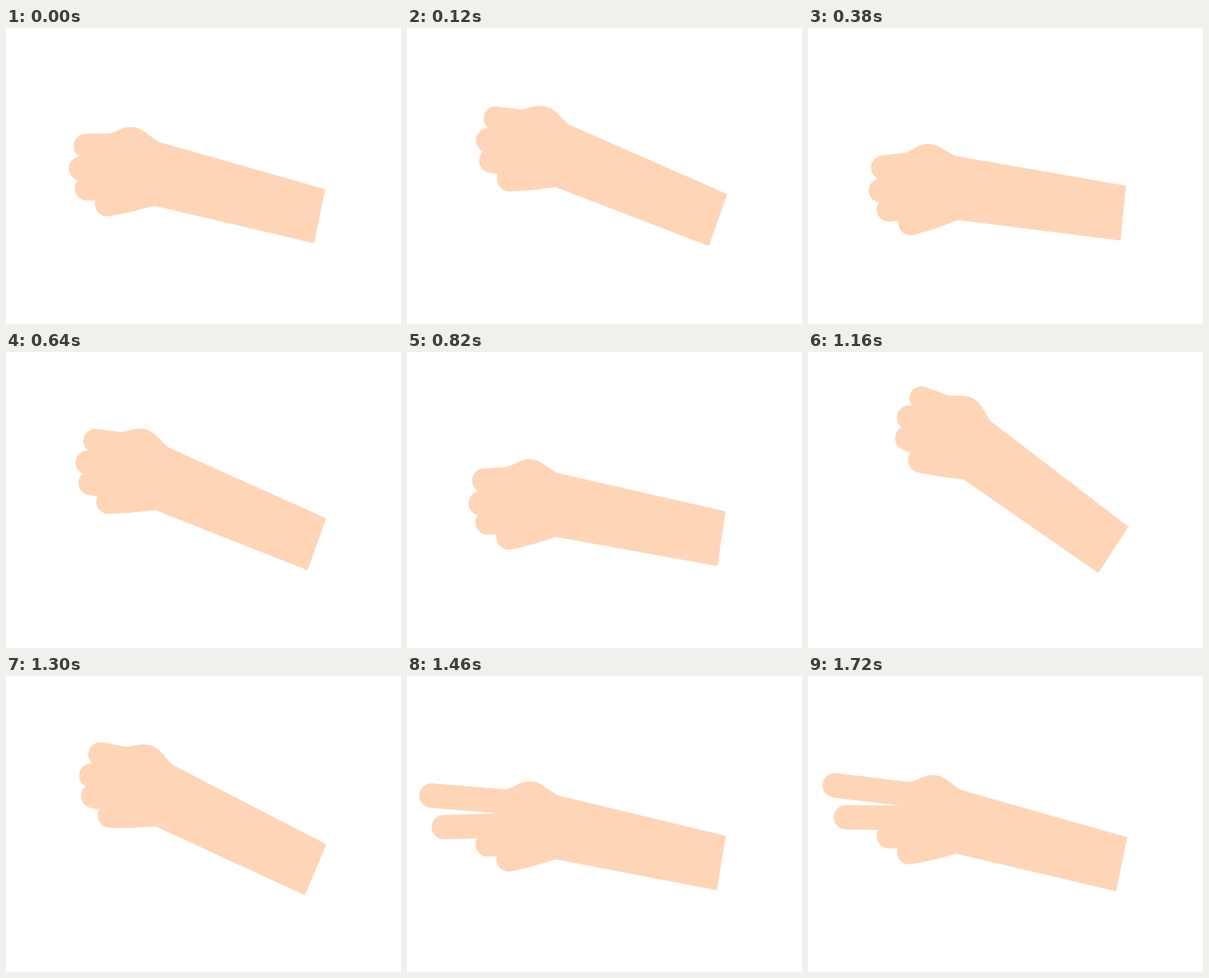
These frames come from a looping animation (500 px wide and 375 px high, 8 s). An HTML page:

```html
<!DOCTYPE html>
<html lang="en">
<head>
<meta charset="utf-8">
<title>Hand game</title>
<style>
  html, body { margin: 0; width: 100%; height: 100%; overflow: hidden; background: #fff; }
  svg { display: block; width: 100vw; height: 100vh; }
  .finger { stroke: #ffd5b8; stroke-width: 31; stroke-linecap: round; }
</style>
</head>
<body>
<svg viewBox="0 0 500 375">
  <g id="arm" fill="#ffd5b8">
    <path d="M404 204.3 L390 272.8 L188 225.3 C170 230 148 236 128 238.5 L128 215 L110 203
             L118 165 L128 148 L128 134.3 C140 132 146 125.5 158 125.5 C174 125.5 180 137 194 144.5 Z"/>
    <line class="finger" x1="128" y1="223" x2="160" y2="216.5"/>
    <line class="finger" x1="102.5" y1="203" x2="140" y2="203"/>
    <line class="finger" id="middle"/>
    <line class="finger" id="index"/>
  </g>
</svg>
<script>
const LOOP = 8000;
const PIVOT = '360 217';

const sine = p => (1 - Math.cos(Math.PI * p)) / 2;
const drop = p => p ** 1.89;
const settle = p => 1 - (1 - p) ** 3;

// time, angle in degrees, easing towards that step
const swing = [
  [0, 0],
  [150, 8.6, sine],
  [395, -6.1, sine],
  [665, 8.6, sine],
  [815, -3, sine],
  [1030, 25, sine],
  [1430, -3.2, drop],
  [1720, 0, settle]
];

// folded and stretched positions: tip x, tip y, base x, base y
const fingers = {
  index: [[101, 149.5, 138, 149], [34, 138.5, 128, 150]],
  middle: [[95, 178, 140, 178], [48, 179, 135, 180]]
};

const mix = (a, b, p) => a + (b - a) * p;
const byId = id => document.getElementById(id);

function angleAt(t) {
  const i = swing.findIndex(step => step[0] > t);
  if (i < 0) return 0;
  const [t0, a0] = swing[i - 1];
  const [t1, a1, ease] = swing[i];
  return mix(a0, a1, ease((t - t0) / (t1 - t0)));
}

function draw(t) {
  byId('arm').setAttribute('transform', `rotate(${angleAt(t)} ${PIVOT})`);
  const open = sine(Math.min(1, Math.max(0, (t - 1320) / 110)));
  for (const [id, [folded, stretched]] of Object.entries(fingers)) {
    ['x1', 'y1', 'x2', 'y2'].forEach((name, i) =>
      byId(id).setAttribute(name, mix(folded[i], stretched[i], open)));
  }
}

const start = performance.now();
function tick() {
  draw((performance.now() - start) % LOOP);
  requestAnimationFrame(tick);
}
tick();
</script>
</body>
</html>
```
